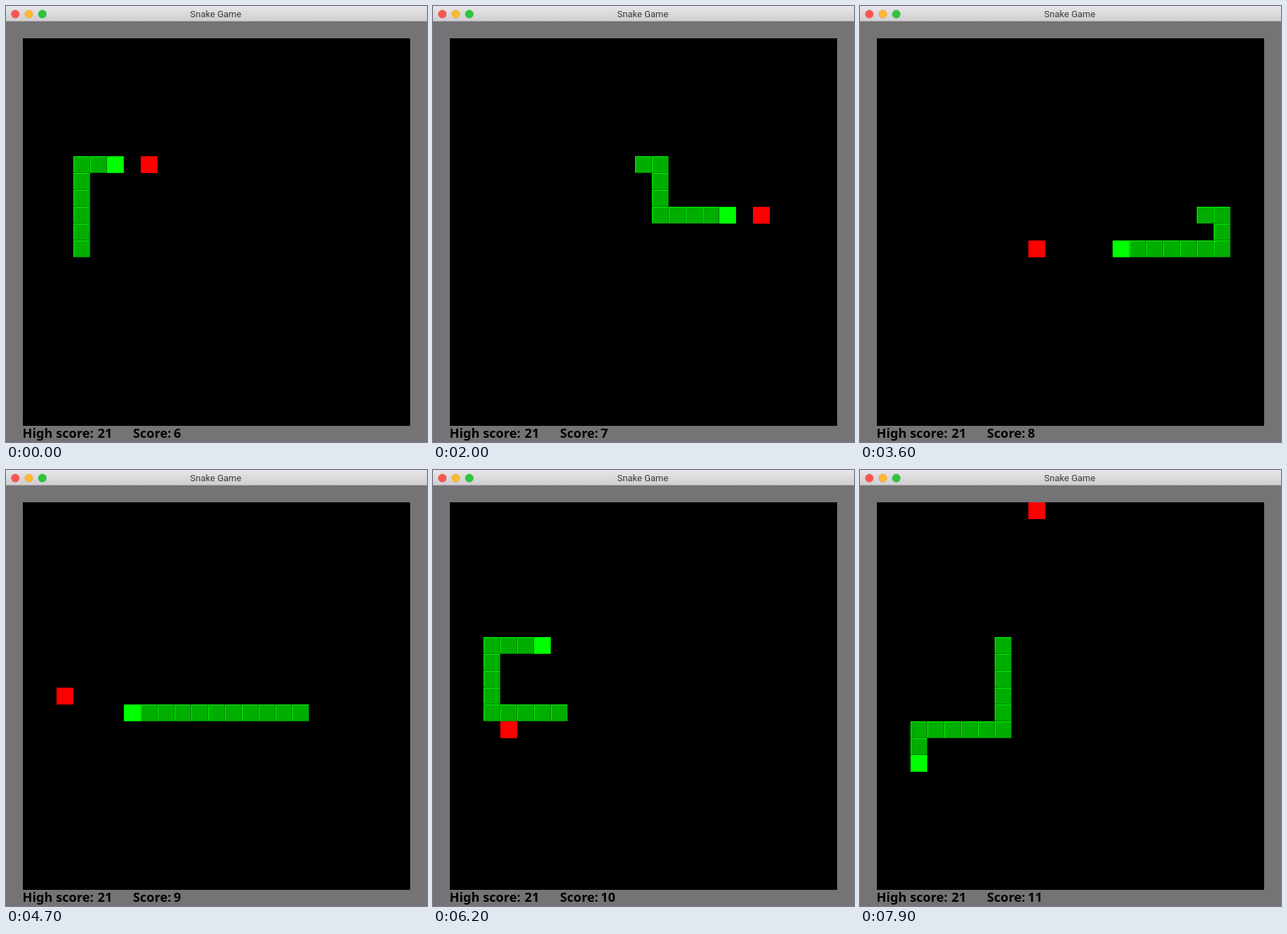
Write an HTML page with a canvas that moves like this. It is 600 px wide and 621 px high and loops after 8 s.

```html
<!DOCTYPE html>
<html lang="en">
<head>
<meta charset="utf-8">
<title>Snake Game</title>
<style>
  html, body { margin: 0; width: 100%; height: 100%; overflow: hidden; background: #757375; }
  canvas { display: block; }
</style>
</head>
<body>
<canvas id="stage" width="600" height="621"></canvas>
<script>
const ctx = document.getElementById('stage').getContext('2d');
const LOOP = 8000, TICK = 100, CELL = 24, LEFT = 24, TOP = 46, START_LENGTH = 8;

// Ticks on which the snake rests
const rests = [2, 6, 9, 12, 16, 19, 23, 26, 30, 33, 37, 41, 45, 49, 53, 57, 61, 66, 71, 76];
const foods = [[7, 7], [18, 10], [9, 12], [2, 11], [3, 13], [9, 0]];
const steps = { U: [0, -1], D: [0, 1], L: [-1, 0], R: [1, 0] };

// Every cell the head visits, beginning with the first tail cell
const path = [[3, 12]];
for (const leg of 'U5 R9 D3 R8 D2 L18 U4 R5 D5 L5 D2'.split(' ')) {
  const [dx, dy] = steps[leg[0]];
  for (let i = +leg.slice(1); i > 0; i--) {
    const [x, y] = path[path.length - 1];
    path.push([x + dx, y + dy]);
  }
}

function rect(color, x, y, w, h) {
  ctx.fillStyle = color;
  ctx.fillRect(x, y, w, h);
}

function cell([col, row], fill, light = fill, dark = fill) {
  const x = LEFT + col * CELL, y = TOP + row * CELL;
  rect(dark, x, y, CELL, CELL);
  rect(light, x, y, CELL - 1, CELL - 1);
  rect(fill, x + 1, y + 1, CELL - 2, CELL - 2);
}

function text(str, x, y, font, color, align = 'left') {
  ctx.font = font;
  ctx.fillStyle = color;
  ctx.textAlign = align;
  ctx.fillText(str, x, y);
}

function drawWindow() {
  rect('#757375', 0, 0, 600, 621);
  const bar = ctx.createLinearGradient(0, 0, 0, 21);
  bar.addColorStop(0, '#e8e6e8');
  bar.addColorStop(1, '#d0ced0');
  rect(bar, 0, 0, 600, 21);
  rect('#b2b0b2', 0, 21, 600, 1);
  [['#fc5650', '#df4640'], ['#fdb92f', '#de9f34'], ['#2bc53c', '#27a934']].forEach(([fill, edge], i) => {
    ctx.beginPath();
    ctx.arc(13.3 + i * 19.2, 11.5, 5.6, 0, Math.PI * 2);
    ctx.fillStyle = fill;
    ctx.fill();
    ctx.strokeStyle = edge;
    ctx.lineWidth = 0.7;
    ctx.stroke();
  });
  text('Snake Game', 299, 16, '13px Roboto, sans-serif', '#3a3a3a', 'center');
  rect('#000', LEFT, TOP, 23 * CELL, 23 * CELL);
}

function draw(time) {
  const tick = Math.floor(time % LOOP / TICK);
  const moves = tick - rests.filter(r => r <= tick).length;
  const head = START_LENGTH - 1 + moves;

  let eaten = 0;
  for (let i = START_LENGTH; i <= head; i++) {
    if (String(path[i]) === String(foods[eaten])) eaten++;
  }

  drawWindow();
  cell(foods[eaten], '#f00');
  for (let i = head - START_LENGTH - eaten + 1; i < head; i++) {
    cell(path[i], '#00ae00', '#00f800', '#007c00');
  }
  cell(path[head], '#0f0', '#0f0', '#00d800');

  const font = 'bold 18.2px "Noto Sans", sans-serif';
  text('High score:', 23.5, 615, font, '#000');
  text('21', 130.5, 615, font, '#000');
  text('Score:', 181, 615, font, '#000');
  text(6 + eaten, 239, 615, font, '#000');
}

const start = performance.now();
function frame() {
  draw(performance.now() - start);
  requestAnimationFrame(frame);
}
frame();
</script>
</body>
</html>
```
